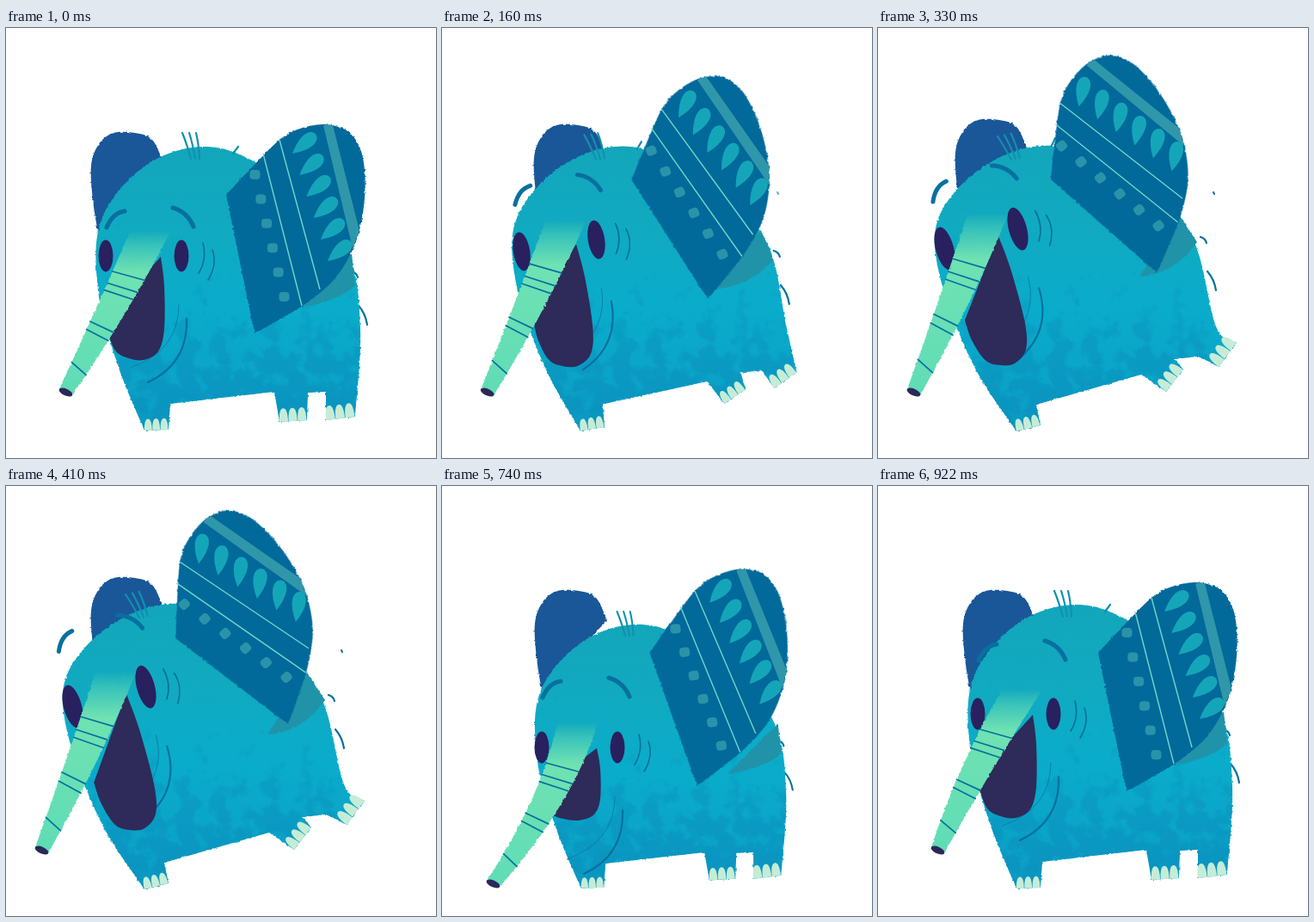
These frames come from a looping animation (500x500 px, 990 ms). An HTML page:

```html
<!DOCTYPE html>
<html lang="en">
<head>
<meta charset="utf-8">
<title>Laughing elephant</title>
<style>
html, body { margin: 0; width: 100%; height: 100%; overflow: hidden; background: #fff; }
svg { display: block; width: 100vw; height: 100vh; }
.line { fill: none; stroke: #08709f; stroke-linecap: round; }
.tuft { stroke: #1190b0; }
</style>
</head>
<body>
<svg id="stage" viewBox="0 0 500 500">
  <defs>
    <linearGradient id="skin" gradientUnits="userSpaceOnUse" x1="0" y1="140" x2="0" y2="465">
      <stop offset="0" stop-color="#13a6bb"/><stop offset=".3" stop-color="#10aac1"/>
      <stop offset=".55" stop-color="#0aaccb"/><stop offset="1" stop-color="#0b9fc7"/>
    </linearGradient>
    <linearGradient id="snout" x1="0" y1="0" x2="0" y2="1">
      <stop offset="0" stop-color="#16abbc"/><stop offset=".08" stop-color="#36c2ba"/>
      <stop offset=".25" stop-color="#70e2b2"/><stop offset="1" stop-color="#5fdcb6"/>
    </linearGradient>
    <linearGradient id="shade" gradientUnits="userSpaceOnUse" x1="0" y1="250" x2="0" y2="425">
      <stop offset="0" stop-opacity=".2"/><stop offset="1" stop-opacity=".75"/>
    </linearGradient>
    <filter id="rough" filterUnits="userSpaceOnUse" x="0" y="0" width="500" height="500" color-interpolation-filters="sRGB">
      <feTurbulence type="fractalNoise" baseFrequency=".3" numOctaves="2" seed="4"/>
      <feDisplacementMap in="SourceGraphic" scale="3" xChannelSelector="R" yChannelSelector="G"/>
    </filter>
    <filter id="mottle" filterUnits="userSpaceOnUse" x="0" y="0" width="500" height="500" color-interpolation-filters="sRGB">
      <feTurbulence type="fractalNoise" baseFrequency=".05" numOctaves="5" seed="9" result="noise"/>
      <feComposite in="noise" in2="SourceAlpha" operator="arithmetic" k2="1" k3="1" k4="-1"/>
      <feComponentTransfer result="patches"><feFuncA type="linear" slope="5"/></feComponentTransfer>
      <feFlood flood-color="#0a8ebb" flood-opacity=".8"/>
      <feComposite in2="patches" operator="in"/>
      <feComposite in2="SourceAlpha" operator="in"/>
    </filter>
  </defs>
</svg>
<script>
const points = s => s.match(/\S+ \S+/g).map(p => p.split(' ').map(Number));
const mix = (a, b, t) => a.map((v, k) => v + (b[k] - v) * t);
const blend = (a, b, t) => points(a).map((p, i) => mix(p, points(b)[i], t));
const degrees = (p, q) => Math.atan2(q[1] - p[1], q[0] - p[0]) * 180 / Math.PI;
const repeat = (n, f) => Array.from({ length: n }, (_, i) => f(i)).join('');

// Smooth path through the given points
function curve(p) {
  let d = 'M' + p[0];
  for (let i = 0; i < p.length - 1; i++) {
    const a = p[i - 1] || p[i], b = p[i], c = p[i + 1], e = p[i + 2] || c;
    d += `C${b.map((v, k) => v + (c[k] - a[k]) / 6)} ${c.map((v, k) => v - (e[k] - b[k]) / 6)} ${c}`;
  }
  return d;
}

const shape = (d, fill) => `<path d="${d}" fill="${fill}"/>`;
const line = (d, width, more = '') => `<path class="line" d="${d}" stroke-width="${width}" ${more}/>`;
const group = (transform, ...parts) => `<g transform="${transform}">${parts.join('')}</g>`;
const rough = (...parts) => `<g filter="url(#rough)">${parts.join('')}</g>`;

const rim = points('256 194 285 163 318 130 342 117 370 112 396 119 411 138 417 165 417 198 411 235 400 264 380 294 345 323 289 355');
const farRim = points('107 238 101 200 99 160 108 135 125 122 150 122 170 130 183 156');

function nearEar({ tilt, dip }) {
  const drop = i => group(`translate(${333 + 8.2 * i} ${146 + 25 * i}) rotate(-40)`,
    shape('M0 0Q14-8 24-8C39-8 39 8 24 8Q14 8 0 0', '#14a6b8'));
  const dot = i => `<rect x="${283.5 + 6.8 * i}" y="${165 + 28.4 * i}" width="12" height="11" rx="4" fill="#2b93a8"/>`;
  return group(`translate(${289 + .95 * tilt} ${355 - 1.9 * tilt + 9 * dip}) rotate(${-tilt}) translate(-289 -355)`,
    rough(shape(curve(rim) + 'Z', '#02699b')),
    shape('M369 113L380 113L411 236L403 256Z', '#3097aa'),
    '<path d="M299 146L344 323M318 130L365 304" stroke="#6ed8c6" stroke-width="1.4"/>',
    repeat(6, dot), repeat(6, drop));
}

// Three toenails standing on the line from p to q
function foot(p, q) {
  const length = Math.hypot(q[0] - p[0], q[1] - p[1]), w = length / 6, h = length * .48;
  return group(`translate(${p}) rotate(${degrees(p, q)})`,
    repeat(3, i => shape(`M${2 * i * w} 0q0 ${-h} ${w} ${-h}q${w * .9} 0 ${w * .9} ${h}Z`, '#c5ecd6')));
}

function body({ lean, dip }) {
  const back = blend('161 468 130 392 107 305 112 220 170 155 250 140 340 190 398 262 412 350 406 452',
                     '161 469 110 390 71 285 72 217 126 159 203 137 300 170 365 243 393 347 417 366', lean);
  const belly = blend('372 456 372 423 351 424 350 456 318 458 312 423 191 437 189 467',
                      '396 394 372 382 345 385 355 397 335 423 306 403 184 438 189 462', lean);
  const [a, b, c, d] = blend('340 325 402 262 406 300 381 320', '304 289 350 217 371 249 345 286', lean);
  const outline = curve(back) + 'L' + belly.join(' ') + 'Z';
  // Dipping squashes the body towards the front foot
  return group(`translate(175 465) scale(${1 - .05 * dip} ${1 - .07 * dip}) translate(-175 -465)`,
    group(`translate(${-27 * lean} ${-40 * lean})`, line('M410 323Q418 332 420 345M402 283Q408 285 409 290', 2.2)),
    rough(shape(outline, 'url(#skin)')),
    `<g filter="url(#mottle)">${shape(outline, 'url(#shade)')}</g>`,
    foot(back[0], belly[7]), foot(belly[4], belly[3]), foot(belly[0], back[9]),
    rough(shape(`M${a}L${b}L${c}Q${d} ${a}Z`, '#2093a8')),
    group(`translate(${-66 * lean} ${4 * lean}) rotate(${-12 * lean} 205 122)`,
      line(repeat(3, i => `M${205 + 8 * i} 122q${5 - i} 12 ${10 - 3 * i} 30`) + 'M264 146L270 138', 2.2, 'style="stroke:#1190b0"')));
}

function face({ lean, lift, gape }) {
  const eye = x => `<ellipse cx="${x}" cy="265" rx="${8.5 + 2 * lean}" ry="${18.5 + 7 * lean}" fill="#29205f"/>`;
  const mouth = curve(points('180 266 184 300 184 350 177 376 160 386 143 384 128 376 119 355 117 335')) + 'Z';
  return line('M210 338Q212 390 165 412', 2)
    + line('M201 322Q201 375 145 395', 1, 'opacity=".7"')
    + line('M240 258Q246 275 235 293M229 250Q234 269 224 285', 1.6)
    + eye(116) + eye(204)
    + line(`M117 ${232 - lift}q7-17 21-19M194 ${209 - lift}q17 5 24 22`, 5)
    + group(`translate(0 265) scale(1 ${gape}) translate(0 -265)`, shape(mouth, '#2e2a59'));
}

// Two bowed edges from the brow to the tip, joined by rings
function trunk({ bend, sway }, cx, cy, lean, drop) {
  const edge = (x1, x2, y2, bow) => {
    const top = [cx + x1 + sway, cy - 28], tip = [x2 - 28 * lean + sway, y2 + drop];
    const mid = mix(top, tip, .5);
    return [top, [mid[0] + bend + bow, mid[1] - 4], tip];
  };
  const at = ([a, b, c], t) => mix(mix(a, b, t), mix(b, c, t), t);
  const left = edge(-16, 62, 420, 0), right = edge(31, 77, 427, 8);
  const rings = [.26, .335, .38, .58, .63, .835]
    .map(t => `M${at(left, t)}L${at(right, t + .045)}`).join('');
  return rough(shape(`M${left[0]}L${right[0]}Q${right[1]} ${right[2]}L${left[2]}Q${left[1]} ${left[0]}Z`, 'url(#snout)'))
    + line(rings, 1.7)
    + group(`translate(${mix(left[2], right[2], .5)}) rotate(${degrees(left[2], right[2])})`,
        '<ellipse rx="8.5" ry="4" fill="#2b2858"/>');
}

function draw(pose) {
  const { lean, drop, far } = pose;
  const cx = 160 - 40 * lean, cy = 265 - 20 * lean + drop;
  return group(`translate(${far} ${-15 * lean})`, rough(shape(curve(farRim) + 'Z', '#1a5798')))
    + body(pose)
    + nearEar(pose)
    + group(`translate(${cx} ${cy}) rotate(${-15 * lean}) translate(-160 -265)`, face(pose))
    + trunk(pose, cx, cy, lean, drop)
    + line('M390 191l1 2', 2, `opacity="${lean}"`);
}

const still = { lean: 0, dip: 0, tilt: 0, drop: 0, lift: 0, gape: 1, far: 0, sway: 0, bend: 3 };
const crouch = { dip: 1, tilt: 8, drop: 26, gape: .7, far: 9 };
const poses = [
  { until: 80 },
  { until: 160, ...crouch },
  { until: 330, lean: .6, tilt: 21, lift: 22, gape: 1.17, far: 8 },
  { until: 410, lean: 1, tilt: 37, lift: 23, gape: 1.24, far: -9 },
  { until: 740, lean: 1, tilt: 41, lift: 33, gape: 1.31 },
  { until: 820, ...crouch, drop: 39, lift: 25, sway: -10, bend: 22 },
  { until: 990, lift: 29, bend: -10 },
];

const stage = document.getElementById('stage');
stage.insertAdjacentHTML('beforeend',
  poses.map(p => `<g class="pose" display="none">${draw({ ...still, ...p })}</g>`).join(''));
const views = stage.querySelectorAll('.pose');

let shown = -1;
const start = performance.now();
function tick() {
  const t = (performance.now() - start) % 990;
  const now = poses.findIndex(p => t < p.until);
  if (now !== shown) {
    views.forEach((v, i) => v.setAttribute('display', i === now ? 'inline' : 'none'));
    shown = now;
  }
  requestAnimationFrame(tick);
}
tick();
</script>
</body>
</html>
```
